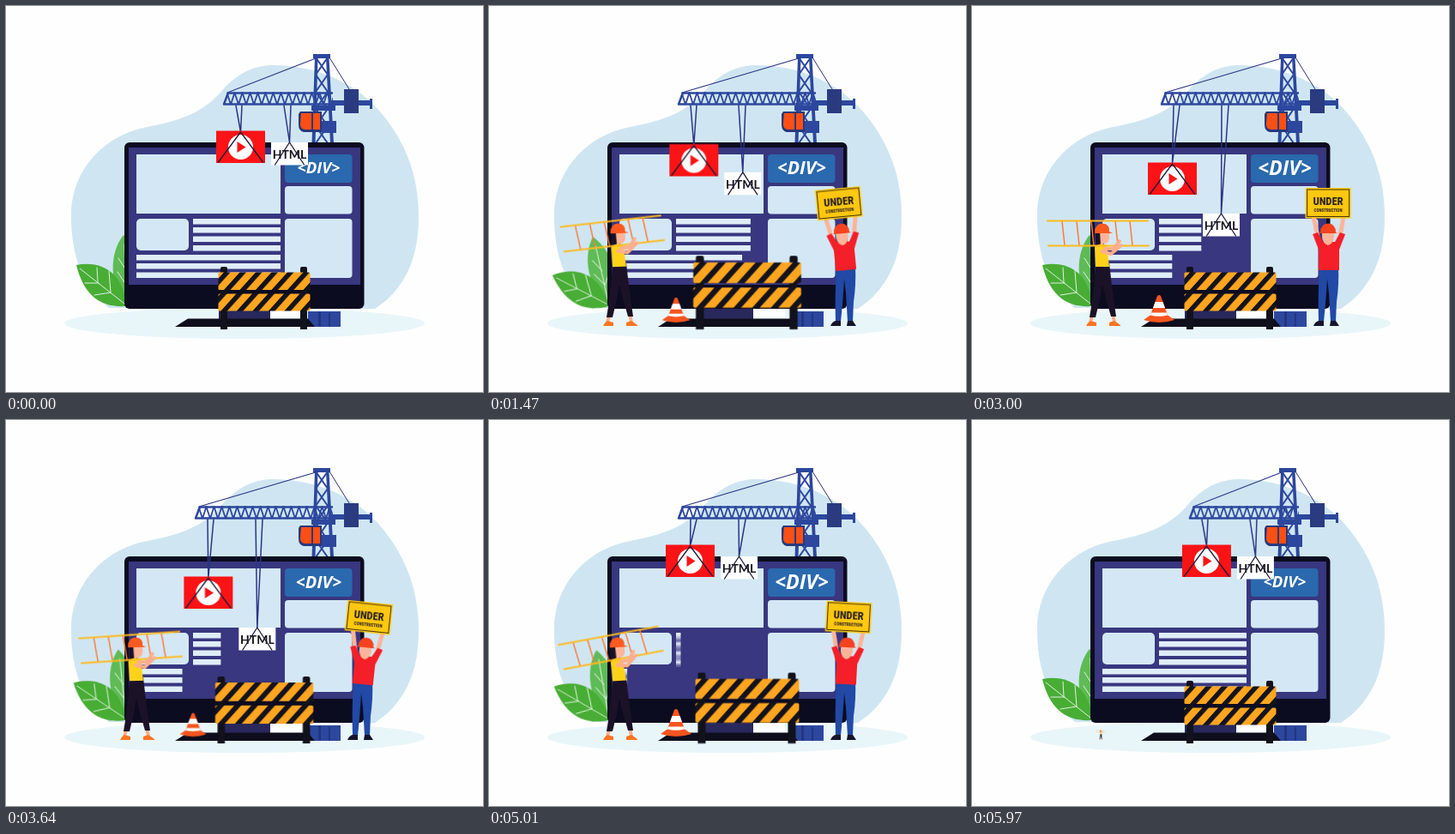
An HTML page without scripts that plays this animation: 556x450 px, repeating every 6 s.

```html
<!DOCTYPE html>
<html lang="en">
<head>
<meta charset="utf-8">
<title>Website under construction</title>
<style>
html, body { margin: 0; width: 100%; height: 100%; overflow: hidden; background: #fefefe; }
svg { display: block; width: 556px; height: 450px; }
svg * { animation: 6s cubic-bezier(.36, 0, .64, 1) infinite; }

.leaves { transform-origin: 140px 350px; animation-name: lean; animation-duration: 3s; }
.barrier { transform-origin: 301px 377px; animation-name: swell; animation-duration: 3s; }
.tag { transform-origin: 364.5px 189px; animation-name: beat; animation-duration: 2s; }
.squash { transform-origin: 218px 369px; animation-name: squash; animation-duration: 2s; }
.rows { animation-name: erase; }
.rows.a { transform-origin: 218px 0; }
.rows.b { transform-origin: 152px 0; }
.slide { animation-name: slide; }
.cable { transform-origin: 361px 61px; animation-name: cable; vector-effect: non-scaling-stroke; }
.load { animation-name: load; }
.video { --drop: 37px; }
.html { --drop: 83px; }
.rope1 { animation-name: rope1; }
.rope2 { animation-name: rope2; }
.cone { transform-origin: 218px 369px; animation-name: pop; }
.man { transform-origin: 415px 373px; animation-name: pop; }
.sway { transform-origin: 415px 306px; animation-name: sway; }
.woman { transform-origin: 150px 373px; animation-name: late; }
.tilt { --a: -4deg; transform-origin: 150px 302px; animation-name: tilt; }
.lift { --a: -9deg; transform-origin: 147px 288px; animation-name: tilt; }

@keyframes lean { 50% { transform: rotate(-11deg); } }
@keyframes swell { 50% { transform: scale(1.175); } }
@keyframes beat { 50% { transform: scale(1.26); } }
@keyframes squash { 0%, 100% { transform: scale(.8); } 50% { transform: scale(1); } }
@keyframes erase { 0%, 98.3%, 100% { transform: scaleX(1); } 98.2% { transform: scaleX(0); } }
@keyframes slide { 0%, 100% { transform: translateX(33px); } 16%, 83.5% { transform: none; } }
@keyframes cable { 0%, 100% { transform: scaleX(.757); } 16%, 83.5% { transform: scaleX(1); } }
@keyframes load {
  0%, 100% { transform: translate(2px, 0); }
  16% { transform: translate(-2px, 0); }
  35% { transform: translate(3.5px, var(--drop)); }
  50% { transform: translate(-5px, var(--drop)); }
  65.5% { transform: translate(-2px, var(--drop)); }
  83.4% { transform: translate(-4px, 0); }
}
@keyframes rope1 {
  0%, 100% { d: path("M235 116L240.5 147L242 116"); }
  16% { d: path("M235 116L236.5 147L242 116"); }
  35% { d: path("M235 116L242 184L242 116"); }
  50% { d: path("M235 116L233.5 184L242 116"); }
  65.5% { d: path("M235 116L236.5 184L242 116"); }
  83.4% { d: path("M235 116L234.5 147L242 116"); }
}
@keyframes rope2 {
  0%, 100% { d: path("M291 116L297.5 159L299 116"); }
  16% { d: path("M291 116L293.5 159L299 116"); }
  35% { d: path("M291 116L299 242L299 116"); }
  50% { d: path("M291 116L290.5 242L299 116"); }
  65.5% { d: path("M291 116L293.5 242L299 116"); }
  83.4% { d: path("M291 116L291.5 159L299 116"); }
}
@keyframes pop { 0%, 97%, 100% { transform: scale(0); } 11%, 88% { transform: scale(1); } }
@keyframes late {
  0%, 8%, 100% { transform: scale(0); }
  17% { transform: scale(1); }
  91.7% { transform: scale(1); animation-timing-function: ease-in; }
}
@keyframes sway {
  0%, 12.5%, 95%, 100% { transform: rotate(0deg); }
  31.25% { transform: rotate(-7.5deg); }
  68.75% { transform: rotate(7.7deg); }
}
@keyframes tilt {
  0%, 14.5%, 50%, 100% { transform: rotate(0deg); }
  34.5% { transform: rotate(var(--a)); }
  78.3% { transform: rotate(calc(var(--a) * .94)); }
}

.tag { font: italic 700 18.5px "Open Sans", sans-serif; fill: #fff; }
.label { font: 700 14px Lato, sans-serif; fill: #15151c; }
.sign { font-family: "Liberation Sans Narrow", "Roboto Condensed", "Open Sans Condensed", Roboto, sans-serif; font-weight: 700; font-stretch: condensed; fill: #1c1a20; }
text { text-anchor: middle; }
.line { fill: none; stroke-linecap: round; stroke-linejoin: round; }
</style>
</head>
<body>
<svg viewBox="0 0 556 450">
  <defs>
    <pattern id="truss" x="220" y="100" width="9" height="16" patternUnits="userSpaceOnUse">
      <path d="M0 15L4.500 1L9 15" fill="none" stroke="#2c479d" stroke-width="1.800"/>
    </pattern>
    <pattern id="mast" x="359" y="60" width="18" height="20" patternUnits="userSpaceOnUse">
      <path d="M2 0L16 20M16 0L2 20" fill="none" stroke="#2c479d" stroke-width="2"/>
    </pattern>
    <pattern id="stripes" x="256" width="18.500" height="20" patternUnits="userSpaceOnUse" patternTransform="skewX(-42)">
      <rect width="18.500" height="20" fill="#ffa51f"/>
      <rect width="7.500" height="20" fill="#14131c"/>
    </pattern>
    <clipPath id="front"><path d="M200 90H381V125H200Z"/></clipPath>
  </defs>

  <path fill="#cfe6f2" d="M120 352C86 326 76 285 76 245C76 190 115 152 160 142C200 134 225 127 248 103C268 78 290 69 312 69C350 69 400 82 435 122C470 162 481 205 481 245C481 295 465 330 430 353Z"/>
  <ellipse cx="278" cy="370" rx="210" ry="18" fill="#e8f6fa"/>

  <g class="leaves">
    <path fill="#5fbb55" d="M140 350C120 325 120 288 137 267C158 290 160 325 140 350Z"/>
    <path class="line" stroke="#dff2e0" d="M140 345L138 278M140 325L130 310M140 308L131 294M140 325L148 310"/>
    <path fill="#48ad35" d="M140 350C108 352 90 335 82 302C114 296 138 314 140 350Z"/>
    <path class="line" stroke="#dff2e0" d="M138 347L86 306M122 334L120 309M107 322L106 305M122 334L103 337M108 323L92 323"/>
  </g>

  <!-- crane -->
  <g fill="#2c479d">
    <rect x="359" y="60" width="18" height="100" fill="url(#mast)"/>
    <path d="M358 56H378V61H358ZM360 60H363.500L360.500 160H356.500ZM373 60H376.500L382 160H378Z"/>
    <path d="M378 110H427V116H378ZM424 108H427V120H424ZM356 116H384V122H356ZM368 134H385V148H368Z"/>
    <path d="M352 356H390V374H352Z"/>
    <path d="M364 356H367V374H364ZM376 358H378V374H376Z" fill="#223681"/>
    <rect x="394" y="97" width="17" height="28" fill="#2b3b80"/>
    <path d="M343 123H368V147H347Q341 146 341 138V126Z" fill="#29397c"/>
    <path d="M344 125H356V144H348Q343 143 343 138ZM358 125H366V144H358Z" fill="#fb4f14"/>
  </g>
  <path class="line" stroke="#2d2f70" d="M377 60L400 97"/>
  <path class="line cable" stroke="#2b3585" stroke-width="1.300" d="M361 61L225 101"/>
  <g clip-path="url(#front)">
    <g class="slide">
      <path d="M225 100H430V116H220Z" fill="url(#truss)"/>
      <path class="line" stroke="#2c479d" stroke-width="2.500" d="M430 101.500H226L221 114.500H430"/>
    </g>
  </g>

  <!-- monitor -->
  <path fill="#fdfeff" d="M308 353H345V364H308Z"/>
  <path fill="#28285c" d="M248 352H308V366H248Z"/>
  <path fill="#0e0e1c" d="M197 374L212 364.500H352L360 374Z"/>
  <rect x="138" y="159" width="279.500" height="194" rx="6" fill="#0c0c20"/>
  <path fill="#38377f" d="M143 165H413V325H143Z"/>
  <g fill="#d3e8f4">
    <path d="M152 173H320V242H152Z"/>
    <rect x="152" y="248" width="61" height="37" rx="5"/>
    <rect x="325" y="210" width="78.500" height="32.500" rx="4"/>
    <rect x="325" y="248" width="78.500" height="69" rx="4"/>
    <rect x="325" y="173" width="78.500" height="33" rx="4" fill="#2a69ad"/>
    <path class="rows a" fill="#dfedf7" d="M218 248h102v6.500h-102zM218 258h102v6.500h-102zM218 268.500h102v6.500h-102zM218 279h102v6.500h-102z"/>
    <path class="rows b" fill="#dfedf7" d="M152 290h168v6.500h-168zM152 300h168v6.500h-168zM152 310.500h168v6.500h-168z"/>
  </g>
  <text class="tag" x="364.500" y="195.500">&lt;DIV&gt;</text>

  <!-- hanging cards -->
  <g class="slide">
    <path class="line rope1" stroke="#2b3585" stroke-width="1.500" d="M235 116L240.500 147L242 116"/>
    <path class="line rope2" stroke="#2b3585" stroke-width="1.500" d="M291 116L297.500 159L299 116"/>
    <g class="load video">
      <g transform="translate(238.500 147)">
        <rect x="-28.500" y="-1.500" width="57" height="37.500" fill="#fb1316"/>
        <circle cy="17.500" r="14.500" fill="#fefefe"/>
        <path fill="#fb1316" d="M-4 11L6 17.500L-4 24Z"/>
        <path class="line" stroke="#201a38" stroke-width="1.300" d="M-26 35L0 0L26 35"/>
      </g>
    </g>
    <g class="load html">
      <g transform="translate(295.500 159)">
        <rect x="-21.500" y="0" width="43" height="26.500" fill="#fefefe"/>
        <text class="label" y="19">HTML</text>
        <path class="line" stroke="#201a38" stroke-width="1.300" d="M-17 26L0 0L17 26"/>
      </g>
    </g>
  </g>

  <g class="cone">
    <g class="squash">
      <path fill="#f6551f" d="M200 366L207 361H229L236 366Q218 372 200 366ZM216 338Q218 336 220 338L229 363Q218 367 207 363Z"/>
      <path fill="#fefefe" d="M213.500 345H222.500L225 352H211ZM209 357.500H227L228 360.500Q218 363 208 360.500Z"/>
    </g>
  </g>

  <g class="barrier">
    <path fill="#12121c" d="M250 306Q250 304 252 304H256Q258 304 258 306V377H250ZM343 306Q343 304 345 304H349Q351 304 351 306V377H343Z"/>
    <rect x="247.500" y="310.500" width="107" height="20.500" rx="1.500" fill="url(#stripes)"/>
    <rect x="247.500" y="335.500" width="107" height="20" rx="1.500" fill="url(#stripes)"/>
  </g>

  <g class="man">
    <path fill="#2149a5" d="M405 303H427Q428 325 425 345L424 368H418L416 335L414 318Q413 340 410 368H404Q403 340 405 303Z"/>
    <path fill="#15142a" d="M398 373Q400 368 404 367H410V373ZM418 367H424L428 373H417Z"/>
    <g class="sway">
      <path class="line" stroke="#fdb498" stroke-width="5" d="M404 274L398.500 248M428 274L432.500 248"/>
      <path fill="#f41f28" d="M397 266L403 264L409 275H423L429 264L435 266L428 284V308H404V284Z"/>
      <path fill="#fdb498" d="M408 262H422V270Q420 278 415 279Q409 277 408 270Z"/>
      <path fill="#f5421f" d="M406 264Q406 254 415 253.500Q424 254 424 264L426 265H405Z"/>
      <rect x="388.500" y="212" width="53" height="35.500" fill="#ffc70f"/>
      <rect x="390.500" y="214" width="49" height="31.500" fill="none" stroke="#40360f"/>
      <text class="sign" x="415" y="231.500" font-size="12.500">UNDER</text>
      <text class="sign" x="415" y="239.500" font-size="5">CONSTRUCTION</text>
    </g>
  </g>

  <g class="woman">
    <path class="line" stroke="#fdae8c" stroke-width="4" d="M141 358L138 369M164 358L166 369"/>
    <path fill="#1c1228" d="M144 300H160Q163 330 168 362H162Q156 342 152 324Q149 344 144 363H137Q142 335 144 300Z"/>
    <path fill="#fb7420" d="M133 373Q135 369 138 367L145 369V373ZM160 369L166 367L173 372V373H160Z"/>
    <g class="tilt">
      <path fill="#1c1228" d="M144 262H154V284Q146 286 144 278Z"/>
      <path fill="#fdb498" d="M149 262H160V271Q159 277 154 277L150 280Z"/>
      <path fill="#ffd21a" d="M143 281Q149 275 157 279L160 304H144Z"/>
      <path fill="#fb5a1e" d="M143 264Q143 254 152 253.500Q161 254 160 263L164 265H143Z"/>
      <g class="lift">
        <path class="line" stroke="#fb7a36" stroke-width="1.500" d="M105 251L108 279M122 251L125 279M139 251L142 279M167 251L170 279M184 251L187 279"/>
        <path class="line" stroke="#fdb91f" stroke-width="2.200" d="M88 250.500H205M89 279.500H206"/>
        <path class="line" stroke="#fdae8c" stroke-width="4" d="M151 286L162 289L174 279M155 283L165 283L172 274"/>
      </g>
    </g>
  </g>
</svg>
</body>
</html>
```
